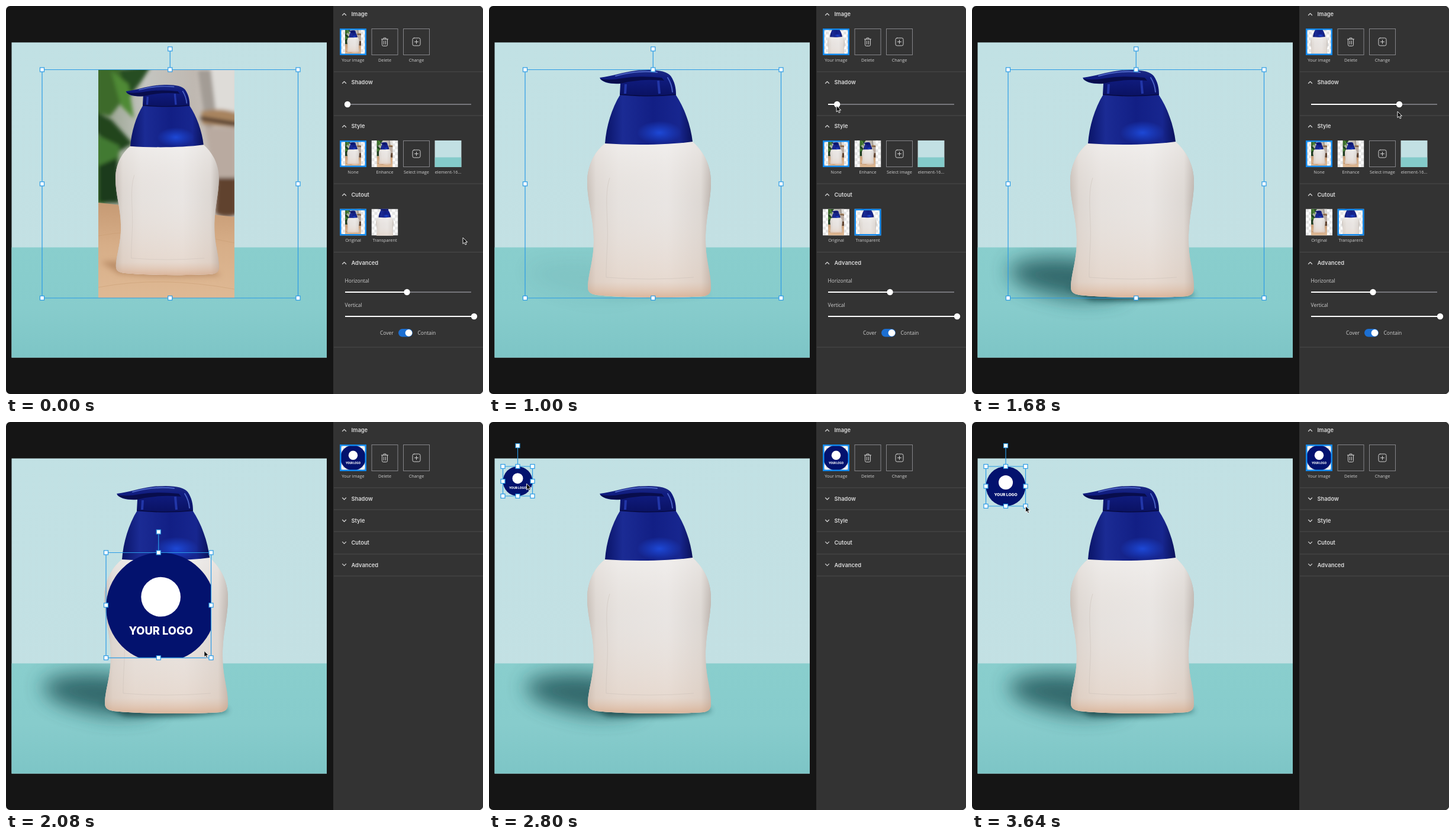
Write an HTML page that moves like this. It is 806x655 px and loops after 3680 ms.

```html
<!DOCTYPE html>
<html lang="en">
<head>
<meta charset="utf-8">
<title>Product image editor</title>
<style>
html,body{margin:0;width:100%;height:100%;overflow:hidden;background:#fff}
svg{display:block}
text{font-family:"Open Sans",sans-serif;fill:#cfcfcf}
.head{font:600 9.3px Inter,sans-serif;fill:#dadada}
.small{font-size:7.3px;text-anchor:middle}
.field{font-size:8.5px}
.line{fill:none;stroke:#d0d0d0;stroke-linecap:round;stroke-linejoin:round}
</style>
</head>
<body>
<svg id="stage" width="806" height="655" viewBox="0 0 806 655">
<defs>
  <clipPath id="round"><rect width="806" height="655" rx="7"/></clipPath>
  <clipPath id="floorClip"><rect x="9.5" y="407.5" width="532.5" height="186"/></clipPath>
  <clipPath id="photoClip"><rect x="156" y="107" width="230" height="386"/></clipPath>
  <clipPath id="logoClip"><rect id="logoRect"/></clipPath>
  <pattern id="check" width="10" height="10" patternUnits="userSpaceOnUse">
    <rect width="10" height="10" fill="#fdfdfd"/><path d="M0 0h5v10h5V5H0z" fill="#e4e4e4"/>
  </pattern>
  <linearGradient id="wall" x2=".3" y2="1"><stop stop-color="#c1e1e4"/><stop offset="1" stop-color="#c4e0e3"/></linearGradient>
  <linearGradient id="floor" x2="0" y2="1"><stop stop-color="#89cecd"/><stop offset=".55" stop-color="#87cccc"/><stop offset="1" stop-color="#7dc5c6"/></linearGradient>
  <linearGradient id="body">
    <stop stop-color="#c4bbb4"/><stop offset=".07" stop-color="#dcd6d1"/><stop offset=".25" stop-color="#e6e2df"/>
    <stop offset=".65" stop-color="#e9e6e4"/><stop offset=".92" stop-color="#dcd7d3"/><stop offset="1" stop-color="#b9b1ab"/>
  </linearGradient>
  <linearGradient id="warm" x2="0" y2="1">
    <stop stop-color="#fff" stop-opacity=".35"/><stop offset=".4" stop-color="#e8ddd5" stop-opacity=".08"/>
    <stop offset=".9" stop-color="#e3c5af" stop-opacity=".38"/><stop offset="1" stop-color="#d6a27e" stop-opacity=".7"/>
  </linearGradient>
  <linearGradient id="collar">
    <stop stop-color="#0a1468"/><stop offset=".2" stop-color="#1b2b94"/><stop offset=".55" stop-color="#121f85"/>
    <stop offset=".85" stop-color="#17268f"/><stop offset="1" stop-color="#0a115a"/>
  </linearGradient>
  <radialGradient id="glow"><stop stop-color="#1d48d6"/><stop offset="1" stop-color="#1d48d6" stop-opacity="0"/></radialGradient>
  <linearGradient id="pump" x2="0" y2="1"><stop stop-color="#1d2b83"/><stop offset=".3" stop-color="#101c80"/><stop offset="1" stop-color="#0a1263"/></linearGradient>
  <linearGradient id="room"><stop stop-color="#8f9c86"/><stop offset=".35" stop-color="#c4c5c0"/><stop offset=".7" stop-color="#bfb8b1"/><stop offset="1" stop-color="#d3ccc6"/></linearGradient>
  <linearGradient id="wood" x2="0" y2="1"><stop stop-color="#c69a74"/><stop offset=".45" stop-color="#d7ae88"/><stop offset="1" stop-color="#dfb994"/></linearGradient>
  <filter id="b3" x="-50%" y="-50%" width="200%" height="200%"><feGaussianBlur stdDeviation="3"/></filter>
  <filter id="b5" x="-50%" y="-150%" width="200%" height="400%"><feGaussianBlur stdDeviation="5"/></filter>
  <filter id="b18" x="-60%" y="-120%" width="220%" height="340%"><feGaussianBlur stdDeviation="17"/></filter>

  <g id="bottle">
    <path id="torso" fill="url(#body)" d="M196 232C178 246 166 270 166 297C166 330 177 358 177 395C177 430 168 450 167 474C167 484 172 486 182 488C230 493 320 493 362 490C373 488 375 484 375 474C375 450 366 430 366 395C366 355 375 330 375 297C375 268 362 245 344 229Z"/>
    <use href="#torso" style="fill:url(#warm)"/>
    <path fill="url(#warm)" d="M196 232C178 246 166 270 166 297C166 330 177 358 177 395C177 430 168 450 167 474C167 484 172 486 182 488C230 493 320 493 362 490C373 488 375 484 375 474C375 450 366 430 366 395C366 355 375 330 375 297C375 268 362 245 344 229Z"/>
    <path fill="none" stroke="#c9bfb8" stroke-opacity=".5" d="M204 290C194 320 202 360 200 400S198 445 198 458Q270 464 346 458"/>
    <path fill="url(#collar)" d="M196 232C198 204 207 173 222 149H315C330 171 341 202 344 229C300 235 240 235 196 232Z"/>
    <ellipse cx="288" cy="214" rx="38" ry="20" fill="url(#glow)"/>
    <path fill="url(#pump)" d="M187 121C210 118 225 112 248 109C280 106 300 109 307 118C314 128 316 139 316 149C285 153 250 152 221 149L222 131C207 132 191 130 187 121Z"/>
    <path fill="#080d4c" d="M188 123Q205 126 225 122Q255 117 292 121L296 126Q258 122 222 131Q196 131 188 123Z"/>
    <path fill="none" stroke="#4a62c4" stroke-width="2" stroke-linecap="round" d="M214 118Q250 108 284 112M302 121Q309 132 310 145"/>
    <path fill="none" stroke="#2236a8" stroke-width="4" d="M286 126L288 148M231 132L230 148"/>
    <path fill="none" stroke="#070b42" stroke-width="1.6" d="M221 149.500Q270 154 316 149.500"/>
  </g>

  <g id="photo" clip-path="url(#photoClip)">
    <rect x="156" y="107" width="230" height="386" fill="url(#room)"/>
    <g filter="url(#b3)">
      <path fill="#dedcd8" d="M322 100H390V185H345Z"/>
      <path fill="#a39c95" d="M324 107L346 107 356 190 340 220Z"/>
      <path fill="#3c6b2c" d="M150 100H192L205 150 176 186 150 180Z"/>
      <path fill="#284d22" d="M192 107L246 100 228 128 204 160Z"/>
      <path fill="#4f8a35" d="M178 110L207 132 216 190 194 168Z"/>
      <path fill="#20441f" d="M150 178L178 192 214 232 190 246 150 212Z"/>
      <path fill="#437a31" d="M150 216L192 236 186 300 168 334H150Z"/>
      <path fill="#1d3a1f" d="M156 270L188 256 192 332H156Z"/>
      <path fill="#b9aaa0" d="M336 205H390V290H350Z"/>
      <path fill="#a8845f" d="M330 178Q360 170 390 180V205L332 200Z"/>
      <path fill="#4a3629" d="M328 186L390 196V203L330 193Z"/>
      <path fill="#60432f" d="M356 290H390V352Q370 360 354 350Z"/>
    </g>
    <path fill="url(#wood)" d="M156 332L386 356V493H156Z"/>
    <path fill="#a4744f" opacity=".55" filter="url(#b5)" d="M160 432Q220 425 350 446L364 455Q260 460 190 452Z"/>
    <path fill="none" stroke="#c89b73" stroke-opacity=".5" d="M156 388Q250 370 386 400M156 475Q260 455 386 478"/>
    <use href="#bottle" transform="translate(46.2 42.8) scale(.836)"/>
  </g>

  <g id="logo">
    <circle cx="50" cy="50" r="50" fill="#03126e"/>
    <circle cx="50" cy="40.300" r="18" fill="#fff"/>
    <text x="50" y="75" text-anchor="middle" style="font:800 9.9px Inter,sans-serif;fill:#fff">YOUR LOGO</text>
  </g>
</defs>

<g clip-path="url(#round)">
  <rect width="806" height="655" fill="#151515"/>
  <rect x="9.500" y="61.500" width="532.500" height="532" fill="url(#wall)"/>
  <rect x="9.500" y="407.500" width="532.500" height="186" fill="url(#floor)"/>
  <g id="shade" clip-path="url(#floorClip)">
    <path fill="#24575a" opacity=".85" filter="url(#b18)" d="M62 440Q110 416 200 430L260 485Q190 505 130 486Q60 470 62 440Z"/>
    <path fill="#10393b" opacity=".75" filter="url(#b5)" d="M160 474L200 484H372L376 488Q300 502 200 496Z"/>
  </g>
  <use id="photoView" href="#photo"/>
  <use id="bottleView" href="#bottle"/>
  <g id="logoView" clip-path="url(#logoClip)"><use id="logoArt" href="#logo"/></g>
  <g id="frame" fill="none" stroke="#2b9be6" stroke-width="1.200"></g>

  <rect x="553" width="253" height="655" fill="#333"/>
  <g id="imageRow"></g>
  <g id="openPanel"></g>
  <g id="foldedPanel"></g>
  <g id="cursor" stroke-linejoin="round">
    <path id="arrow" fill="#0c0c0c" stroke="#fff" stroke-width=".9" d="M0 0V10.500L2.400 8.300 4.100 12 6 11.200 4.300 7.600H7.600Z"/>
    <path id="hand" fill="#fff" stroke="#222" stroke-width=".9" d="M-1.200 1a1.200 1.200 0 0 1 2.400 0V4.500l3 .7q1.200 .4 1 1.700l-.7 3.600q-.2 .8-1 .8h-4q-.7 0-1.100-.6l-2.600-3.600q.5-1 1.600-.4l1.400 1Z"/>
  </g>
</g>
</svg>
<script>
const $ = id => document.getElementById(id);
const LOOP = 3680, STEP = 40, BLUE = '#1188ec';

// ---- panel building ----
const head = (label, y, open) =>
  `<path class="line" stroke-width="1.3" d="M568.5 ${y + (open ? 1.5 : -1.5)}l3 ${open ? -3 : 3} 3 ${open ? 3 : -3}"/>
   <text class="head" x="583.5" y="${y + 3.4}">${label}</text>`;
const rule = y => `<path d="M554 ${y}H806" stroke="#4b4b4b"/>`;
const caption = (x, y, s) => `<text class="small" x="${x + 22.5}" y="${y + 55.5}">${s}</text>`;
const tile = (x, y, art, label, id = '') =>
  `<svg x="${x}" y="${y}" width="45" height="45" ${id}><rect width="45" height="45" fill="url(#check)"/>${art}</svg>${caption(x, y, label)}`;
const ring = (x, y, id = '') =>
  `<rect ${id} x="${x + 1.25}" y="${y + 1.25}" width="42.5" height="42.5" fill="none" stroke="${BLUE}" stroke-width="2.5"/>`;
const button = (x, y, icon, label) =>
  `<rect x="${x + .5}" y="${y + .5}" width="44" height="44" fill="none" stroke="#858589"/>
   <path class="line" transform="translate(${x + 22.5} ${y + 22.5})" d="${icon}"/>${caption(x, y, label)}`;
const slider = (y, x, end = 786, id = '') =>
  `<path d="M573 ${y}H${end}" stroke="#8c8c93" stroke-width="1.6"/>
   <path ${id && `id="${id}Fill"`} d="M573 ${y}H${x}" stroke="#fff" stroke-width="2"/>
   <circle ${id && `id="${id}Knob"`} cx="${x}" cy="${y}" r="5.2" fill="#fff"/>`;
const field = (x, y, s) => `<text class="field" x="${x}" y="${y}">${s}</text>`;

const fit = (name, k, cx, cy, dy = 22.5) =>
  `<use href="#${name}" transform="translate(22.5 ${dy}) scale(${k}) translate(${-cx} ${-cy})"/>`;
const photoArt = fit('photo', 45 / 386, 271, 300);
const bottleArt = fit('bottle', .14, 270.5, 233, 14.5);
const logoArt = '<use href="#logo" transform="translate(1 1) scale(.43)"/>';
const sceneArt = '<rect width="45" height="45" fill="#c2e0e3"/><rect y="28.5" width="45" height="17" fill="#84cbca"/>';
const plus = 'M-4 -6.500H4Q6.500 -6.500 6.500 -4V4Q6.500 6.500 4 6.500H-4Q-6.500 6.500 -6.500 4V-4Q-6.500 -6.500 -4 -6.500ZM-3 0H3M0 -3V3';
const bin = 'M-5.500 -4.500H5.500M-2 -4.500V-6.500H2V-4.500M-4.500 -4.500V5Q-4.500 7 -2.500 7H2.500Q4.500 7 4.500 5V-4.500M-1.500 -1.500V4M1.500 -1.500V4';

$('imageRow').innerHTML = head('Image', 14, true) +
  tile(564, 38, `<g id="thumbPhoto">${photoArt}</g><g id="thumbBottle">${bottleArt}</g><g id="thumbLogo">${logoArt}</g>`, 'Your image') +
  ring(564, 38) + button(617.5, 38, bin, 'Delete') + button(671, 38, plus, 'Change') + rule(111);

$('openPanel').innerHTML =
  head('Shadow', 129, true) + slider(166, 577, 786, 'shadow') + rule(185) +
  head('Style', 203, true) + tile(564, 227, photoArt, 'None') + ring(564, 227) +
  tile(617.5, 227, photoArt, 'Enhance') + button(671, 227, plus, 'Select image') +
  tile(724.5, 227, sceneArt, 'element-16...') + rule(300) +
  head('Cutout', 318.5, true) + tile(564, 342.5, photoArt, 'Original') +
  tile(617.5, 342.5, bottleArt, 'Transparent') +
  ring(564, 342.5, 'id="ringOriginal"') + ring(617.5, 342.5, 'id="ringCut"') + rule(415.5) +
  head('Advanced', 434, true) + field(572.5, 467, 'Horizontal') + slider(483, 677.5) +
  field(572.5, 508, 'Vertical') + slider(524, 791, 791) +
  field(632, 554.5, 'Cover') + field(695.5, 554.5, 'Contain') +
  '<rect x="663" y="545" width="24" height="13.500" rx="6.750" fill="#1c6fd2"/><circle cx="680.500" cy="551.800" r="5.900" fill="#fff"/>' +
  rule(576);

$('foldedPanel').innerHTML = ['Shadow', 'Style', 'Cutout', 'Advanced']
  .map((s, i) => head(s, 129.5 + 37.2 * i, false) + rule(Math.round(148 + 37.3 * i))).join('');

// ---- motion ----
const part = (t, a, b) => Math.min(1, Math.max(0, (t - a) / (b - a)));
const ease = p => p < .5 ? 2 * p * p : 1 - 2 * (1 - p) * (1 - p);
const mix = (a, b, p) => a + (b - a) * p;
const glide = (t, a, b, p, q) => { const e = ease(part(t, a, b)); return p.map((v, i) => mix(v, q[i], e)); };
const show = (id, on) => $(id).style.display = on ? '' : 'none';
const set = (id, attrs) => { for (const k in attrs) $(id).setAttribute(k, attrs[k]); };

const CUT = 400, BADGE = 1720;
const knobX = t => mix(577, 722, part(t, 950, 1600));
const badgeSize = t => mix(214, 50, ease(part(t, 1920, 2400))) + 17 * ease(part(t, 3000, 3340));
const badgePos = t => glide(t, 2460, 2760, [169, 220.5], [23.5, 75]);

function pointer(t) {
  const [x, y] = badgePos(t);
  if (t < 480) return glide(t, 0, 360, [772, 391], [640, 372]);
  if (t < 950) return glide(t, 480, 920, [640, 372], [576, 167]);
  if (t < BADGE) return [knobX(t) - mix(1, 3, part(t, 1500, 1680)), mix(167.5, 178, part(t, 950, 1650))];
  if (t < 1920) return glide(t, 1700, 1910, [719, 178], [383, 434]);
  if (t < 2400) { const s = badgeSize(t + 24); return [x + s, y + s]; }
  if (t < 2460) return glide(t, 2400, 2450, [219, 270], [209, 249.5]);
  if (t < 2800) return [x + 40, y + 29];
  if (t < 3000) return glide(t, 2800, 2980, [63.5, 104], [73.5, 125]);
  const s = badgeSize(t);
  return [x + s, y + s];
}

function drawFrame(x, y, w, h) {
  const dots = [[w / 2, -35]];
  for (const i of [0, .5, 1]) for (const j of [0, .5, 1]) if (i !== .5 || j !== .5) dots.push([w * i, h * j]);
  $('frame').innerHTML = `<path d="M${x} ${y}h${w}v${h}h${-w}zm${w / 2} 0v-35"/>` + dots.map(([a, b]) =>
    `<rect x="${x + a - 3.5}" y="${y + b - 3.5}" width="7" height="7" fill="#fff"/>`).join('');
}

function render(t) {
  const badge = t >= BADGE, cut = t >= CUT;
  show('photoView', !cut); show('bottleView', cut);
  show('thumbPhoto', !cut); show('thumbBottle', cut && !badge); show('thumbLogo', badge);
  show('ringOriginal', !cut); show('ringCut', cut);
  show('openPanel', !badge); show('foldedPanel', badge); show('logoView', badge);

  const k = knobX(t);
  set('shadowFill', { d: `M573 166H${k}` });
  set('shadowKnob', { cx: k });
  $('shade').style.opacity = (k - 577) / 145;

  if (badge) {
    const [x, y] = badgePos(t), s = badgeSize(t);
    set('logoRect', { x, y, width: s, height: s });
    // the artwork trails the handles slightly while resizing
    set('logoArt', { transform: `translate(${x} ${y}) scale(${badgeSize(t - 18) / 100})` });
    drawFrame(x, y, s, s);
  } else drawFrame(61, 107.5, 432.5, 385.5);

  const [px, py] = pointer(t);
  const over = !badge && px > 617 && px < 663 && py > 342 && py < 388;
  show('hand', over); show('arrow', !over);
  set('cursor', { transform: `translate(${px} ${py})` });
}

const start = performance.now();
function tick(now) {
  const t = Math.max(0, now - start) % LOOP;
  render(Math.floor(t / STEP) * STEP);
  requestAnimationFrame(tick);
}
render(0);
requestAnimationFrame(tick);
</script>
</body>
</html>
```
